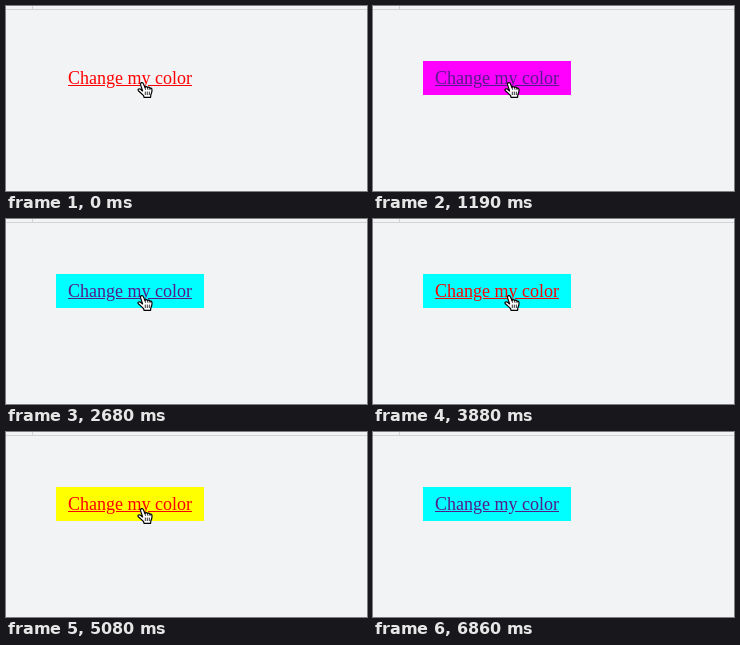
An HTML page that plays this animation: 361 by 185 pixels, repeating every 7160 ms.

```html
<!DOCTYPE html>
<html lang="en">
<head>
<meta charset="utf-8">
<title>Change my color</title>
<style>
  html, body { margin: 0; width: 100%; height: 100%; overflow: hidden; background: #f2f3f5; }
  #link {
    position: absolute; left: 50px; top: 55px; width: 148px; height: 34px;
    box-sizing: border-box; padding: 7px 12px; white-space: nowrap;
    font: 18px/20px "Liberation Serif", Times, serif;
    text-decoration: underline;
  }
  svg { position: absolute; left: 0; top: 0; }
</style>
</head>
<body>
<div id="link">Change my color</div>
<svg width="361" height="185" viewBox="0 0 361 185">
  <path d="M0 3.5H361M26.5 0V3" stroke="#d2d3d5" fill="none"/>
  <g id="hand" transform="translate(131 75)" stroke="#000" stroke-linejoin="round" stroke-linecap="round">
    <path fill="#fff" stroke-width="1.2" d="M5.6 9.9L3.6 3.9C3.1 1.5 5.6.6 6.4 2.8L8 6.6C8.6 5.4 10 5.4 10.6 6.7C11.3 5.7 12.5 6 13 7.3C14 6.7 14.9 7.4 15 8.7C15.2 11 14.6 12.4 13.8 14L13.6 16.3H7L6.6 14.6C5 13 3.6 11.6 1.6 10C.2 8.7 1.6 7.2 3.2 8.1Z"/>
    <path fill="none" stroke-width=".8" d="M8 6.6L8.5 8.4M10.6 6.7L10.9 8.4M13 7.3V8.7M8.3 11V13.6M10.3 11V13.6M12.3 11V13.6"/>
  </g>
  <path id="arrow" d="M.6 1.2V14.8L3.8 11.8L6.2 17.3L8.6 16.3L6.3 10.9H11Z" fill="#000" stroke="#fff" stroke-width="1.1"/>
</svg>
<script>
const LOOP = 7160;
const RED = "#ff0000", VISITED = "#551a8b";
const FILLS = ["#ffff00", "#ff00ff", "#00ffff"];
const PRESSES = [0, 1040, 2530, 3880, 5080, 6270];
const HOLD = 150;
const LEAVE = 6570, EDGE = 6720, GONE = 6860;

const [link, hand, arrow] = ["link", "hand", "arrow"].map(id => document.getElementById(id));
const show = (el, on) => el.setAttribute("visibility", on ? "visible" : "hidden");

function draw(t) {
  const pressed = PRESSES.some(p => t >= p && t < p + HOLD);
  const clicks = PRESSES.filter(p => t >= p + HOLD).length;
  link.style.color = pressed ? RED : VISITED;
  link.style.background = clicks ? FILLS[(clicks - 1) % FILLS.length] : "transparent";

  show(hand, t < LEAVE);
  show(arrow, t >= LEAVE && t < GONE);
  arrow.setAttribute("transform", t < EDGE ? "translate(333 115)" : "translate(360 124)");
}

const start = performance.now();
function tick() {
  draw((performance.now() - start) % LOOP);
  requestAnimationFrame(tick);
}
tick();
</script>
</body>
</html>
```
